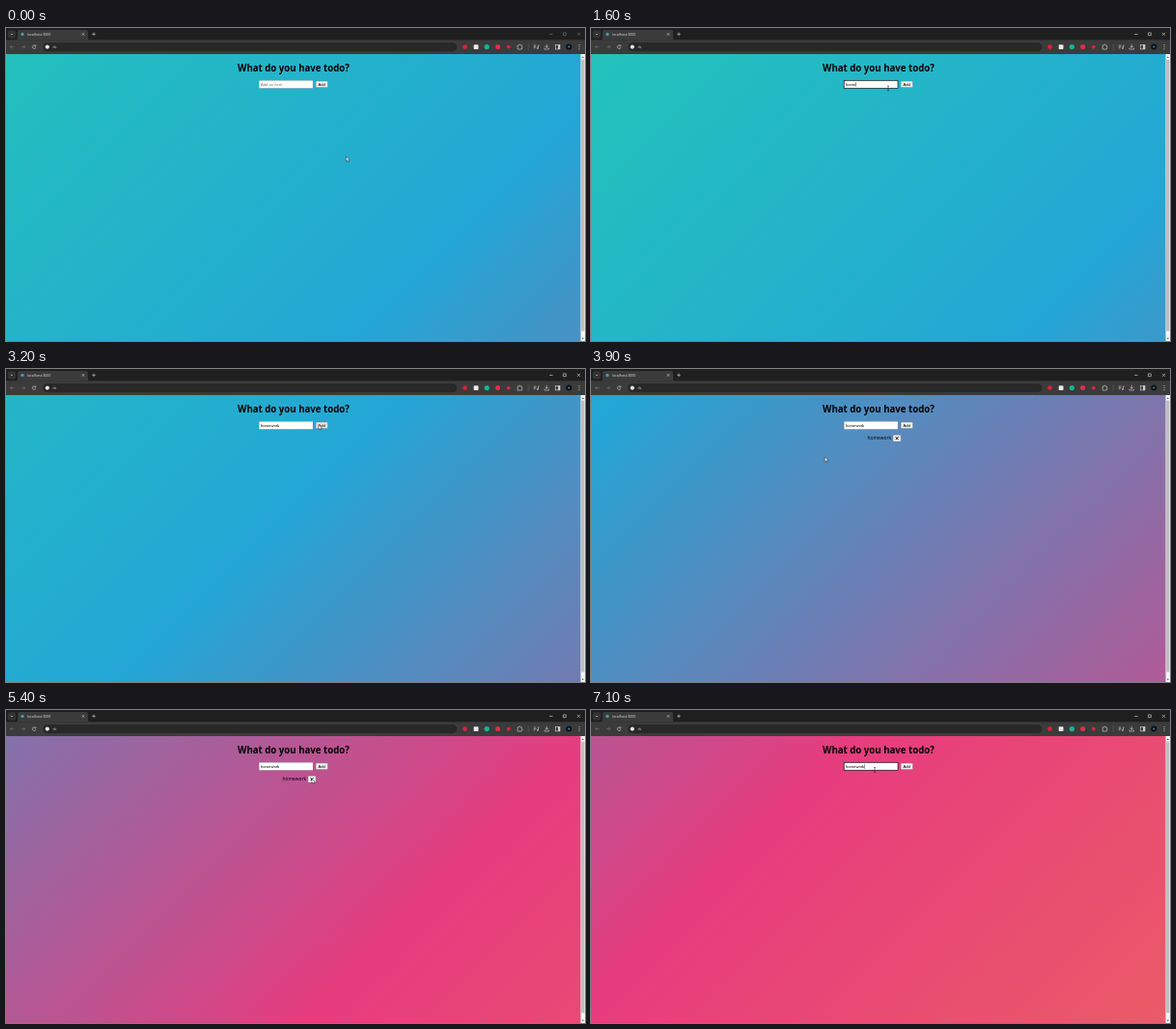
Recreate the animation shown at these times as an HTML page. Size 600 by 324 pixels, loop 7200 ms.

```html
<!DOCTYPE html>
<html lang="en">
<head>
<meta charset="utf-8">
<title>localhost:3000</title>
<style>
  html, body { margin: 0; width: 100%; height: 100%; overflow: hidden; background: #1f1f1f; }
  #page {
    position: absolute; left: 0; top: 27px; width: 595.5px; height: 297px;
    background: linear-gradient(-45deg, #ee7752, #e73c7e, #23a6d5, #23d5ab) 0 50% / 400% 400%;
  }
  svg { position: absolute; left: 0; top: 0; width: 600px; height: 324px; }
  text { white-space: pre; }
  .ui { font-family: "Open Sans", "Noto Sans", sans-serif; }
  .form { font: 4.17px "Liberation Sans", Arial, sans-serif; }
  .line { fill: none; stroke: #d6d6d6; stroke-width: .6; }
</style>
</head>
<body>
<div id="page"></div>
<svg viewBox="0 0 600 324">
  <!-- browser frame -->
  <rect width="600" height="13" fill="#1f1f1f"/>
  <rect y="12.3" width="600" height="14.7" fill="#3b3b3b"/>
  <path d="M10 12.5q2 0 2-2V4q0-2 2-2H83q2 0 2 2v6.5q0 2 2 2z" fill="#3b3b3b"/>
  <rect x="1.8" y="2.2" width="8.4" height="8.4" rx="2.6" fill="#333"/>
  <path class="line" d="M4.9 5.9l1.1 1.1 1.1-1.1"/>
  <circle cx="17" cy="6.4" r="1.7" fill="#3f9fb4"/>
  <text class="ui" x="22" y="7.8" font-size="3.6" fill="#e3e3e3">localhost:3000</text>
  <path class="line" d="M78.8 5.2l2.4 2.4m0-2.4l-2.4 2.4M89.2 6.3h3.6M91 4.5v3.6"/>
  <path id="controls" class="line" d="M563.2 6.4h3.4M577.5 4.9h2.8v2.8h-2.8zM592 4.8l3 3m0-3l-3 3"/>

  <path class="line" style="stroke:#777" d="M8.3 19.6H4.5m1.7-1.7l-1.7 1.7 1.7 1.7M16 19.6h3.8m-1.7-1.7l1.7 1.7-1.7 1.7"/>
  <path class="line" d="M30.6 18.5a1.8 1.8 0 1 0 .3 1.6M30.9 17.5v1.4h-1.4"/>
  <rect x="37.8" y="14.5" width="430" height="10.2" rx="5.1" fill="#282828" stroke="#505050" stroke-width=".4"/>
  <circle cx="42.8" cy="19.6" r="2.1" fill="#e8e8e8"/>
  <text class="ui" x="48.6" y="21.1" font-size="4" fill="#e3e3e3">rk</text>

  <circle cx="475.5" cy="19.6" r="2.4" fill="#d9213b"/>
  <rect x="484.7" y="17.2" width="4.8" height="4.8" rx=".8" fill="#ececec"/>
  <circle cx="498.3" cy="19.6" r="2.6" fill="#17b596"/>
  <circle cx="509.6" cy="19.6" r="2.5" fill="#e0304b"/>
  <circle cx="520.8" cy="19.6" r="1.9" fill="#d32841"/>
  <path class="line" d="M530.2 17.9h1.4a.8.8 0 0 1 1.6 0h1.2v1.3a.8.8 0 0 1 0 1.6v1.2h-4.2z"/>
  <path class="line" style="stroke:#666" d="M541.2 16.5v6.2"/>
  <path class="line" d="M546.8 18h2.6m-2.6 1.4h2.6m-2.6 1.4h1.6m3.1-2.8v3m0-3h1.2"/>
  <circle cx="550.9" cy="21" r=".8" fill="#d6d6d6"/>
  <path class="line" d="M560.3 16.8v3.5m-1.6-1.5l1.6 1.6 1.6-1.6M558 20.6v1.4h4.6v-1.4"/>
  <rect class="line" x="569.6" y="17.3" width="4.4" height="4.6"/>
  <rect x="572.1" y="17.3" width="1.9" height="4.6" fill="#d6d6d6"/>
  <circle cx="583.3" cy="19.6" r="3" fill="#0a1118"/>
  <circle cx="583.3" cy="19.6" r="1" fill="#3d8fb5"/>
  <path d="M594 17.5v0m0 2.1v0m0 2.1v0" stroke="#d6d6d6" stroke-width="1" stroke-linecap="round"/>

  <!-- scrollbar -->
  <rect x="595.5" y="27" width="4.5" height="297" fill="#f3f3f3"/>
  <rect x="596.1" y="32.6" width="3.3" height="281" fill="#bdbdbd"/>
  <path d="M596.6 30.9h2.4l-1.2-1.5zM596.6 320.7h2.4l-1.2 1.5z" fill="#555"/>

  <!-- page content -->
  <text class="ui" x="298" y="44.8" font-size="9.67" font-weight="700" text-anchor="middle">What do you have todo?</text>
  <rect id="field" x="262.2" y="54.3" width="55.8" height="8" fill="#fff"/>
  <text id="value" class="form" x="264" y="59.7"></text>
  <rect id="caret" y="55.9" width=".4" height="4.9"/>
  <rect id="add" x="321.1" y="55" width="12.3" height="6.6" rx=".9" stroke="#767676" stroke-width=".4"/>
  <text class="form" x="323.5" y="59.8">Add</text>
  <g id="item">
    <text class="ui" x="286.6" y="73.1" font-size="4.9">homework</text>
    <rect x="313" y="68.2" width="8.1" height="6.9" rx=".9" fill="#efefef" stroke="#767676" stroke-width=".4"/>
    <path d="M315.7 70.2l2.8 2.9m0-2.9l-2.8 2.9" stroke="#000" stroke-width="1"/>
  </g>

  <path id="arrow" d="M0 0v5l1.15-1 .8 1.8.85-.4-.8-1.7h1.6z" fill="#fff" stroke="#000" stroke-width=".4"/>
  <path id="beam" d="M-.9-2.5h1.8M0-2.5v5M-.9 2.5h1.8" fill="none" stroke="#111" stroke-width=".5"/>
</svg>
<script>
const LOOP = 7200, STEP = 100, GRADIENT = 15000, GRADIENT_START = 2070;
const FOCUS = 700, TYPE = 1100, KEY = 120, BLUR = 3100;
const ADDED = 3300, REMOVED = 5500, REFOCUS = 6900;
const WORD = 'homework';

// time, x, y
const PATH = [
  [0, 352.5, 133], [200, 351, 130], [700, 300, 59], [900, 300, 59],
  [1500, 308, 62.4], [2400, 308, 62.4], [3000, 324, 57.6], [3300, 324, 57.6],
  [3900, 242.3, 91], [4600, 331.5, 79.6], [5050, 317, 71], [5500, 317, 71],
  [6200, 309.5, 80], [6700, 294, 62], [LOOP, 294, 62]
];

const $ = id => document.getElementById(id);
const show = (el, on) => { el.style.display = on ? '' : 'none'; };
const set = (el, attrs) => { for (const k in attrs) el.setAttribute(k, attrs[k]); };
const [page, controls, field, value, caret, add, item, arrow, beam] =
  ['page', 'controls', 'field', 'value', 'caret', 'add', 'item', 'arrow', 'beam'].map($);

const drift = page.animate([
  { backgroundPosition: '0% 50%', easing: 'ease' },
  { backgroundPosition: '100% 50%', easing: 'ease' },
  { backgroundPosition: '0% 50%' }
], { duration: GRADIENT, iterations: Infinity });
drift.pause();

function pointer(t) {
  const i = PATH.findIndex(p => p[0] > t);
  const [t0, x0, y0] = PATH[i - 1], [t1, x1, y1] = PATH[i];
  const u = (t - t0) / (t1 - t0), e = u * u * (3 - 2 * u);
  return [x0 + (x1 - x0) * e, y0 + (y1 - y0) * e];
}

const inside = (x, y, l, t, r, b) => x > l && x < r && y > t && y < b;

function draw(t) {
  drift.currentTime = (t - GRADIENT_START + GRADIENT) % GRADIENT;
  controls.style.stroke = t < FOCUS ? '#777' : '#e3e3e3';

  const count = Math.max(0, Math.min(WORD.length, Math.floor((t - TYPE) / KEY)));
  const focused = (t >= FOCUS && t < BLUR) || t >= REFOCUS;
  value.textContent = count ? WORD.slice(0, count) : 'Add an item';
  set(value, { fill: count ? '#000' : '#757575' });
  set(field, { stroke: focused ? '#101010' : '#8a8a8a', 'stroke-width': focused ? .7 : .3 });

  const typed = TYPE + KEY * WORD.length;
  const since = t >= REFOCUS ? t - REFOCUS : t > typed ? t - typed : t < TYPE ? t - FOCUS : 0;
  show(caret, focused && Math.floor(since / 500) % 2 === 0);
  set(caret, { x: 264.1 + (count ? value.getComputedTextLength() : 0) });

  show(item, t >= ADDED && t < REMOVED);

  const [x, y] = pointer(t);
  const text = inside(x, y, 262, 54, 318, 63);
  set(add, { fill: inside(x, y, 321, 55, 333.5, 61.6) ? '#e5e5e5' : '#efefef' });
  show(beam, text);
  show(arrow, !text);
  set(text ? beam : arrow, { transform: `translate(${x} ${y})` });
}

function tick() {
  draw(Math.floor(performance.now() % LOOP / STEP) * STEP);
  requestAnimationFrame(tick);
}
tick();
</script>
</body>
</html>
```
